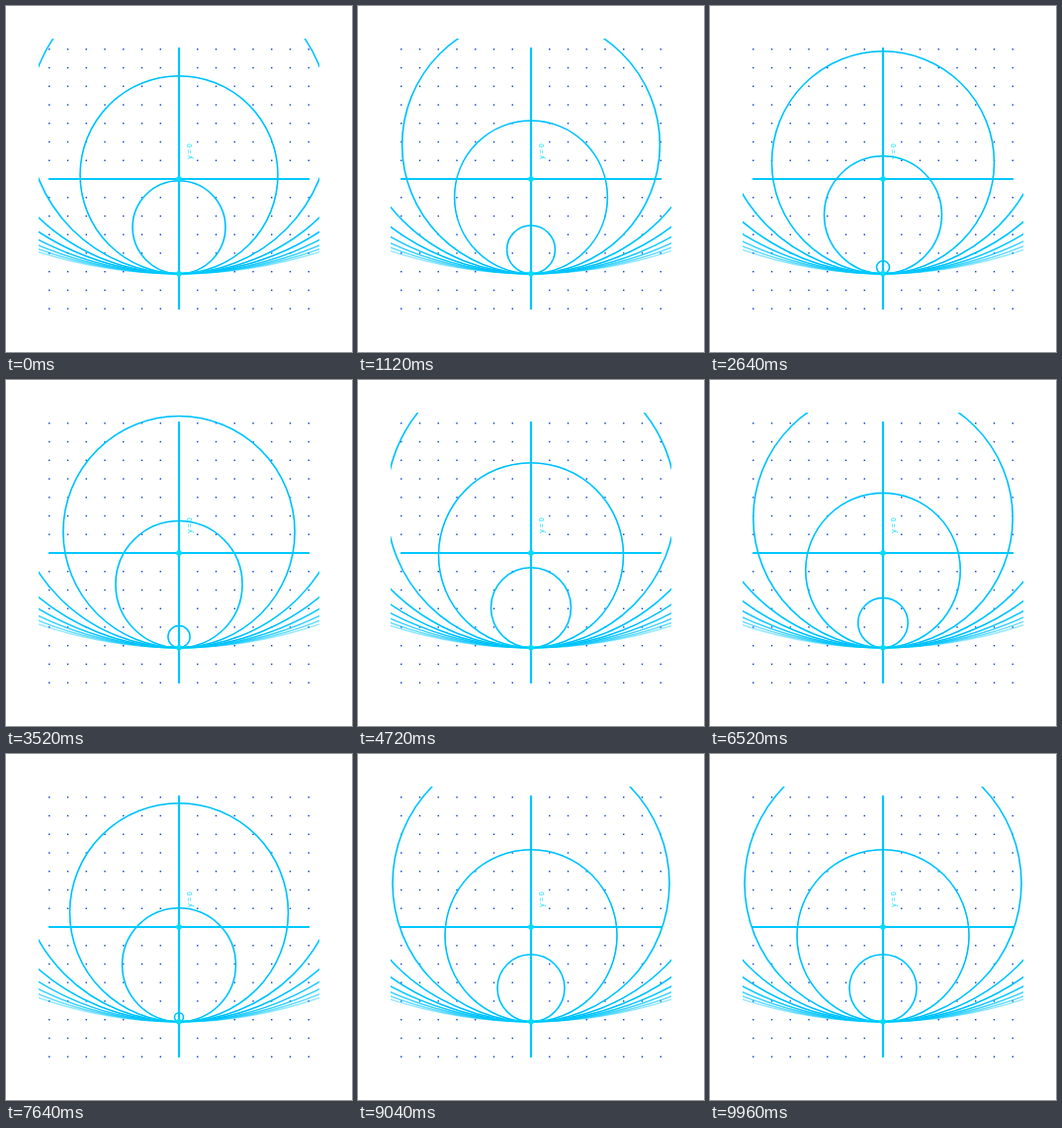
These frames come from a looping animation (350x350 px, 10 s). An HTML page with a canvas:

```html
<!DOCTYPE html>
<html lang="en">
<head>
<meta charset="utf-8">
<title>Tangent circles</title>
<style>
  html, body { margin: 0; width: 100%; height: 100%; overflow: hidden; background: #fff; }
  canvas { display: block; width: 350px; height: 350px; }
</style>
</head>
<body>
<canvas id="stage"></canvas>
<script>
const LOOP = 10000, MID = 175, STEP = 18.75, BASE = 270.8, GAP = 106, COUNT = 9;
const CYAN = '#00dcff', BLUE = '#0088ff';

// [time in ms, diameter of the innermost circle]
const keys = [
  [0, 94], [2080, 13], [3160, 13], [4720, 81], [5880, 8],
  [6160, 22], [6900, 70], [7640, 9], [9040, 68], [LOOP, 68]
];

const canvas = document.getElementById('stage');
const ctx = canvas.getContext('2d');
const ratio = window.devicePixelRatio || 1;
canvas.width = canvas.height = 350 * ratio;
ctx.scale(ratio, ratio);

const rise = i => (keys[i + 1][1] - keys[i][1]) / (keys[i + 1][0] - keys[i][0]);

// Slope at a key: zero at turning points and rests
function slope(i) {
  if (i === 0 || i === keys.length - 1) return 0;
  const a = rise(i - 1), b = rise(i);
  return a * b > 0 ? 2 * a * b / (a + b) : 0;
}

function diameter(t) {
  let i = 0;
  while (i < keys.length - 2 && t >= keys[i + 1][0]) i++;
  const [t0, d0] = keys[i], [t1, d1] = keys[i + 1];
  const span = t1 - t0, u = (t - t0) / span, v = 1 - u;
  return d0 * (1 + 2 * u) * v * v + d1 * (3 - 2 * u) * u * u
    + span * u * v * (slope(i) * v - slope(i + 1) * u);
}

function stroke(path, width) {
  ctx.strokeStyle = CYAN;
  ctx.lineWidth = width;
  ctx.stroke(path);
  ctx.strokeStyle = BLUE;
  ctx.lineWidth = 0.5;
  ctx.stroke(path);
}

function disc(x, y, r) {
  ctx.fillStyle = CYAN;
  ctx.beginPath();
  ctx.arc(x, y, r, 0, 2 * Math.PI);
  ctx.fill();
}

function drawGrid() {
  ctx.fillStyle = '#0038d0';
  for (let i = -7; i <= 7; i++) {
    for (let j = -7; j <= 7; j++) {
      ctx.fillRect(MID + i * STEP - 0.7, MID + j * STEP - 0.7, 1.4, 1.4);
    }
  }
}

function drawCircles(d) {
  ctx.save();
  ctx.beginPath();
  ctx.rect(33, 33, 284, 284);
  ctx.clip();
  for (let k = 0; k < COUNT; k++) {
    const r = (d + k * GAP) / 2;
    const path = new Path2D();
    path.arc(MID, BASE - r, r, 0, 2 * Math.PI);
    ctx.globalAlpha = k < 5 ? 1 : 1 - (k - 4) * 0.17;
    stroke(path, 1.6);
  }
  ctx.restore();
}

function drawAxes() {
  const axes = new Path2D('M43 175H307M175 42V307');
  stroke(axes, 2.2);
  disc(MID, MID, 2.8);
  disc(MID, BASE, 2.8);
}

function drawLabel() {
  ctx.save();
  ctx.translate(186, 147);
  ctx.rotate(-Math.PI / 2);
  ctx.font = '7px "Liberation Sans", sans-serif';
  ctx.textAlign = 'center';
  ctx.textBaseline = 'middle';
  ctx.fillStyle = CYAN;
  ctx.fillText('y = 0', 0, 0);
  ctx.restore();
}

function frame() {
  ctx.fillStyle = '#fff';
  ctx.fillRect(0, 0, 350, 350);
  drawGrid();
  drawCircles(diameter(performance.now() % LOOP));
  drawAxes();
  drawLabel();
  requestAnimationFrame(frame);
}
frame();
</script>
</body>
</html>
```
